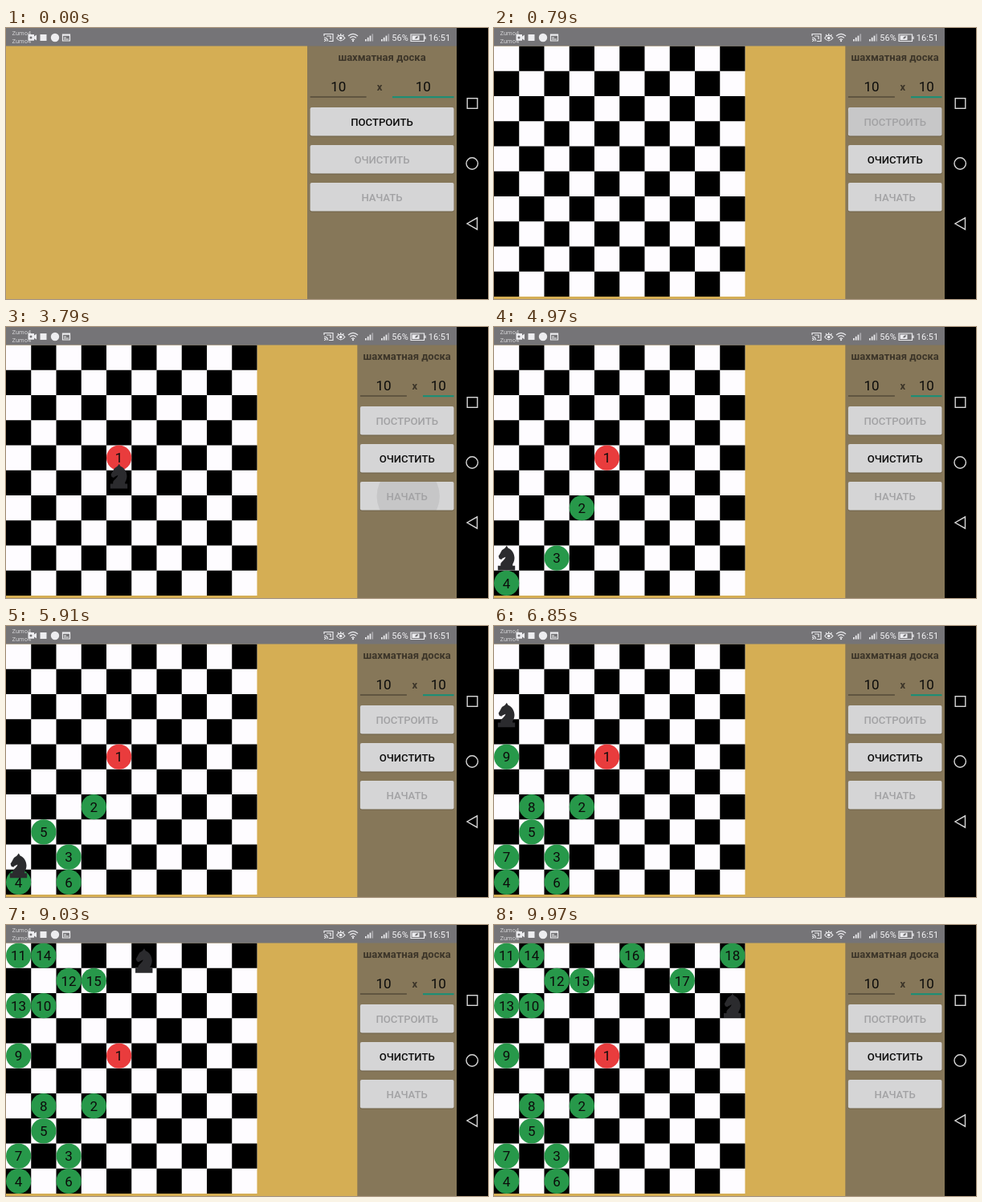
Recreate the animation shown at these times as an HTML page. Size 600 by 338 pixels, loop 10000 ms.

```html
<!DOCTYPE html>
<html lang="ru">
<head>
<meta charset="utf-8">
<title>Шахматная доска</title>
<style>
html, body { margin: 0; width: 100%; height: 100%; overflow: hidden; background: #000; }
svg { display: block; width: 600px; height: 338px; font-family: Roboto, "Noto Sans", sans-serif; }
text { text-anchor: middle; }
.carrier { font-size: 7.5px; fill: #d2d2d4; text-anchor: start; }
.status { font-size: 11px; fill: #f2f2f4; }
.line { fill: none; stroke: #ededf0; stroke-width: 1.2; }
.solid { fill: #ededf0; }
.faint { fill: #a9a8ac; }
.nav { fill: none; stroke: #d6d6d6; stroke-width: 1.4; }
.label { font-size: 13px; font-weight: 700; fill: #3c3529; }
.value { font-size: 17px; fill: #0c0c0b; }
.button { font-size: 13.1px; font-weight: 500; }
</style>
</head>
<body>
<svg viewBox="0 0 600 338">
  <defs>
    <clipPath id="buildClip"><rect id="buildArea" y="99" height="35.5" rx="2"/></clipPath>
    <clipPath id="startClip"><rect id="startArea" y="193" height="35.5" rx="2"/></clipPath>
  </defs>
  <rect width="561" height="338" fill="#d5ae54"/>
  <g id="board"></g>
  <g id="marks"></g>
  <path id="knight" fill="#2b2b2e" d="M15.8 .2L17.6 3.2C22 4.8 25.3 9.6 25.5 15.2C25.6 18 24.6 20.8 23.2 23.2V25H26.2V30.8H4.8V25H8.2V23.2C8.8 19.8 13.8 18 14.4 14.2C12.4 15.6 10.6 15.4 9.2 17.4L6.6 16.4L5.6 13.2C7.4 10.8 8.2 8.2 10 5.6L13.6 3.2Z"/>
  <rect id="panel" y="22" height="316" fill="#867759"/>
  <g id="controls"></g>

  <rect width="561" height="22.5" fill="#757477"/>
  <text class="carrier" x="7.5" y="8.8">Zumo4</text>
  <text class="carrier" x="7.5" y="19">Zumo4</text>
  <path class="solid" d="M27.5 8h7.5v2.4l3-2v7l-3-2v2.4h-7.5z"/>
  <circle cx="31" cy="12" r="1.5" fill="#757477"/>
  <rect class="solid" x="42.5" y="8" width="8" height="8"/>
  <circle class="solid" cx="61" cy="12" r="5.2"/>
  <path class="line" d="M70.5 8h9v8h-9zM70.5 9.2h9M72 12h3M72 14h6"/>
  <path class="line" d="M396 10V7.5h11v9h-5M396 16.5h1M396 14.2q2.2 0 2.4 2.3M396 12q4.4 0 4.6 4.5M399 10h5v4"/>
  <path class="line" d="M411.5 12.5q5.2-6.6 10.4 0q-5.2 6.6-10.4 0M413 8.2l1 1.4M416.7 7v1.7M420.4 8.2l-1 1.4"/>
  <circle class="solid" cx="416.7" cy="12.5" r="1.8"/>
  <path class="line" d="M426 10q6-5.4 12 0M428 12.4q4-3.6 8 0M430 14.6q2-1.6 4 0"/>
  <circle class="solid" cx="432" cy="16.2" r="1.1"/>
  <g id="signals"></g>
  <text class="status" x="490.5" y="16">56%</text>
  <path class="line" d="M504 8h16.5v8.5H504zM522 10.5v3.5"/>
  <path class="solid" d="M505.5 9.5h9v5.5h-9z"/>
  <path d="M509 13q1-3 4-2.6q-.2 3-3 3z" fill="#757477"/>
  <text class="status" x="539.5" y="16">16:51</text>

  <rect x="561" width="39" height="338"/>
  <rect class="nav" x="574.2" y="87.7" width="12.6" height="12.6"/>
  <circle class="nav" cx="580.2" cy="169" r="7.2"/>
  <path class="nav" d="M586.5 236.8v14.4L574 244z"/>
</svg>
<script>
const LOOP = 10000, CELL = 31.25, TOP = 22.5;
const BUILD = 640, PLACE = 2250, PRESS = 3640;
const SHORT_TURN = 0.57; // share of a move spent on its long leg
const route = ['44', '63', '82', '90', '71', '92', '80', '61', '40', '21',
  '00', '12', '20', '01', '13', '05', '17', '09', '28'].map(s => [+s[0], +s[1]]);
const pace = [[0, 3691], [2, 4534], [3, 4866], [8, 6714], [12, 8028], [17, 9775], [18, 10124]];

const $ = id => document.getElementById(id);
function add(parent, tag, attrs, text) {
  const el = document.createElementNS('http://www.w3.org/2000/svg', tag);
  set(el, attrs);
  if (text) el.textContent = text;
  parent.appendChild(el);
  return el;
}
function set(el, attrs) {
  for (const key in attrs) el.setAttribute(key, attrs[key]);
}
const show = (el, on) => set(el, { visibility: on ? 'visible' : 'hidden' });
const clamp = v => Math.max(0, Math.min(1, v));
const ease = v => (1 - Math.cos(Math.PI * clamp(v))) / 2;

// Board
add($('board'), 'rect', { y: TOP, width: CELL * 10, height: CELL * 10, fill: '#fefcff' });
for (let r = 0; r < 10; r++)
  for (let c = (r + 1) % 2; c < 10; c += 2)
    add($('board'), 'rect', { x: c * CELL, y: TOP + r * CELL, width: CELL, height: CELL });

const marks = route.slice(0, -1).map(([r, c], i) => {
  const x = (c + 0.5) * CELL, y = TOP + (r + 0.5) * CELL;
  const g = add($('marks'), 'g', {});
  add(g, 'circle', { cx: x, cy: y, r: 15.6, fill: i ? '#27984a' : '#e93c3d' });
  add(g, 'text', { class: 'value', x, y: y + 6.2 }, String(i + 1));
  return g;
});

// Status bar signal bars
for (const x of [447, 467])
  for (let i = 0; i < 4; i++)
    add($('signals'), 'rect', { class: i < 3 ? 'solid' : 'faint',
      x: x + i * 2.8, y: 14 - i * 2.2, width: 1.7, height: 2.5 + i * 2.2 });

// Side panel
const ui = $('controls');
const title = add(ui, 'text', { class: 'label', y: 41.3 }, 'шахматная доска');
const cross = add(ui, 'text', { class: 'label', y: 78 }, 'x');
const rows = add(ui, 'text', { class: 'value', y: 79 }, '10');
const cols = add(ui, 'text', { class: 'value', y: 79 }, '10');
const rowsLine = add(ui, 'rect', { y: 85.5, height: 1, fill: '#3c3529' });
const colsLine = add(ui, 'rect', { y: 85.2, height: 2, fill: '#159078' });
const cursor = add(ui, 'rect', { y: 62, width: 1.6, height: 22, fill: '#159078' });

function makeButton(y, name, clip) {
  const shade = add(ui, 'rect', { y: y + 1, height: 35.5, rx: 2, fill: '#5d523d', opacity: 0.6 });
  const face = add(ui, 'rect', { y, height: 35.5, rx: 2, fill: '#d5d5d6' });
  const ripple = clip && add(ui, 'circle', { cy: y + 18, fill: '#000', 'clip-path': `url(#${clip})` });
  const label = add(ui, 'text', { class: 'button', y: y + 22.7 }, name);
  return { shade, face, ripple, label };
}
const build = makeButton(99, 'ПОСТРОИТЬ', 'buildClip');
const clear = makeButton(146, 'ОЧИСТИТЬ');
const start = makeButton(193, 'НАЧАТЬ', 'startClip');

function layout(wide) {
  const left = wide ? 375 : 437.3, mid = wide ? 468 : 499.2;
  const x = left + 3.6, width = 557.5 - x;
  set($('panel'), { x: left, width: 561 - left });
  set(title, { x: mid });
  set(cross, { x: wide ? 465 : 508.7 });
  set(rows, { x: wide ? 413.7 : 470 });
  set(cols, { x: wide ? 519.3 : 538.2 });
  set(rowsLine, { x, width: wide ? 70 : 58 });
  set(colsLine, { x: wide ? 481 : 519, width: wide ? 76.5 : 38.5 });
  set(cursor, { x: wide ? 529 : 547.5 });
  for (const b of [build, clear, start]) {
    set(b.shade, { x, width });
    set(b.face, { x, width });
    set(b.label, { x: mid });
    if (b.ripple) set(b.ripple, { cx: mid + 1.5 });
  }
  for (const id of ['buildArea', 'startArea']) set($(id), { x, width });
}

const enable = (b, on) => set(b.label, { fill: on ? '#0d0d0d' : '#a2a2a4' });

function ripple(b, age) {
  set(b.ripple, { r: age < 0 ? 0 : 12 + age * 0.18,
    opacity: age < 0 ? 0 : 0.07 * clamp((650 - age) / 400) });
}

function stepStart(i) {
  const k = Math.max(1, pace.findIndex(p => p[0] >= i));
  const [a, ta] = pace[k - 1], [b, tb] = pace[k];
  return ta + (tb - ta) * (i - a) / (b - a);
}
const starts = route.map((_, i) => stepStart(i));

// Long leg of the L first, then the short one
function knightAt(t) {
  let i = 0;
  while (i < route.length - 2 && t >= starts[i + 1]) i++;
  const [r0, c0] = route[i], [r1, c1] = route[i + 1];
  const p = (t - starts[i]) / (starts[i + 1] - starts[i]);
  const long = ease(p / SHORT_TURN), short = ease((p - SHORT_TURN) / (1 - SHORT_TURN));
  const tall = Math.abs(r1 - r0) === 2;
  return [r0 + (r1 - r0) * (tall ? long : short), c0 + (c1 - c0) * (tall ? short : long)];
}

function draw(t) {
  const built = t >= BUILD;
  layout(!built);
  show($('board'), built);
  show($('knight'), t >= PLACE);
  const [r, c] = knightAt(t);
  set($('knight'), { transform: `translate(${c * CELL} ${TOP + r * CELL})` });
  marks.forEach((m, i) => show(m, t >= starts[i]));
  show(cursor, (t + 770) % 1000 < 500);
  enable(build, !built);
  enable(clear, built);
  enable(start, t >= PLACE && t < starts[0]);
  ripple(build, t - 520);
  ripple(start, t - PRESS);
}

const begin = performance.now();
function tick() {
  draw((performance.now() - begin) % LOOP);
  requestAnimationFrame(tick);
}
tick();
</script>
</body>
</html>
```
